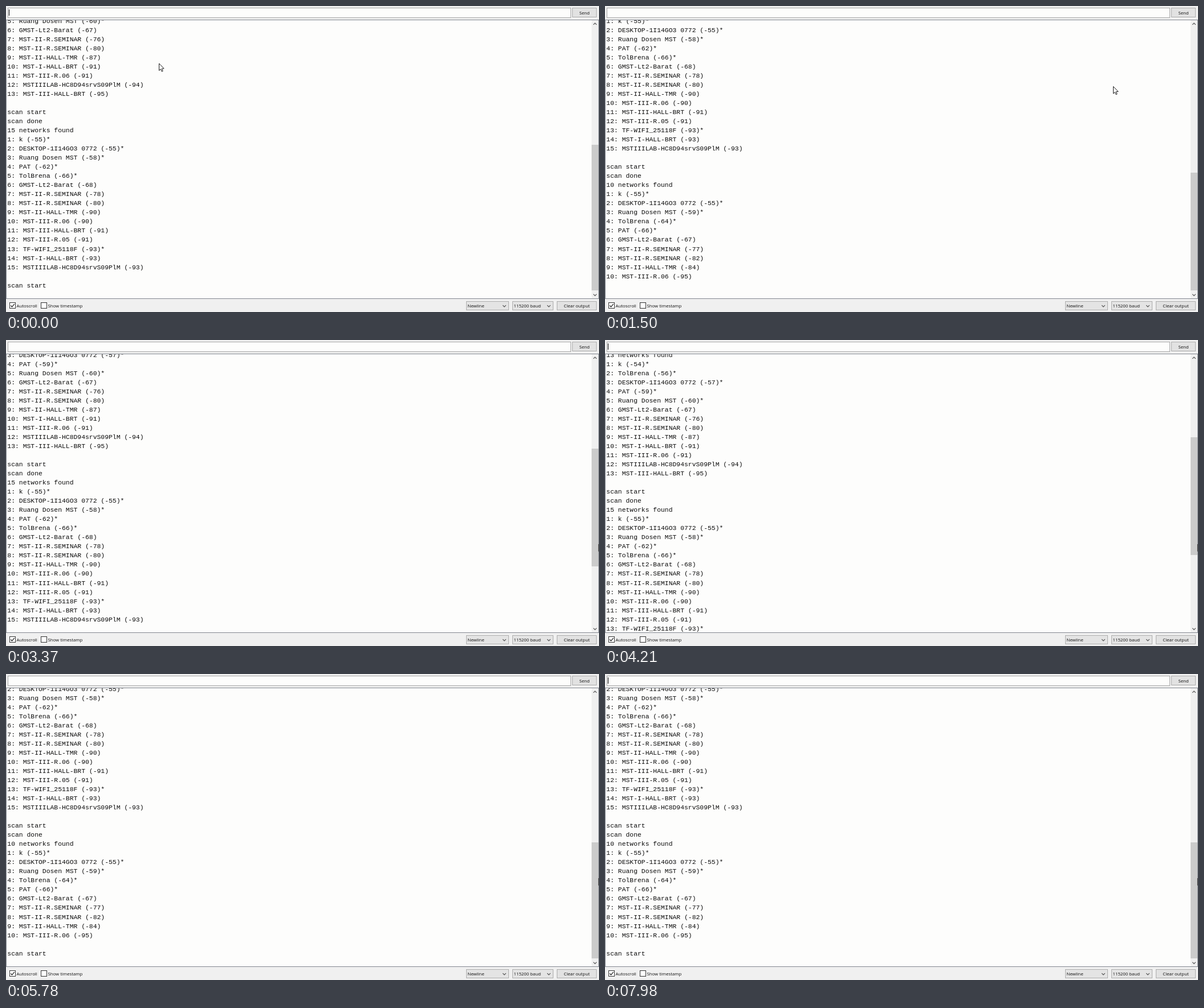
These frames come from a looping animation (1040x538 px, 8 s). An HTML page with a canvas:

```html
<!DOCTYPE html>
<html lang="en">
<head>
<meta charset="utf-8">
<title>Serial monitor</title>
<style>
html, body { margin: 0; width: 100%; height: 100%; overflow: hidden; background: #f0f0f0; }
canvas { display: block; width: 1040px; height: 538px; }
</style>
</head>
<body>
<canvas id="stage" width="1040" height="538"></canvas>
<script>
const ctx = document.getElementById('stage').getContext('2d');
const LOOP = 8000;
const ROW = 16.04, ROWS = 31;
const MONO = '11.4px "Liberation Mono", "Courier New", monospace';
const UI = '7.8px "Open Sans", "Noto Sans", sans-serif';

// Short keys for the access points that keep coming back
const AP = {
  k: 'k', D: 'DESKTOP-1I14GO3 0772', R: 'Ruang Dosen MST', P: 'PAT', F: 'TolBrena',
  G: 'GMST-Lt2-Barat', S: 'MST-II-R.SEMINAR', T: 'MST-II-HALL-TMR', B: 'MST-I-HALL-BRT',
  H: 'MST-III-HALL-BRT', 6: 'MST-III-R.06', 5: 'MST-III-R.05', W: 'TF-WIFI_25118F',
  L: 'MSTIIILAB-HC8D94srvS09PlM'
};
const SECURED = 'kDRPFW';

function scan(spec) {
  const items = spec.split(' ');
  return [
    items.length + ' networks found',
    ...items.map((s, i) =>
      `${i + 1}: ${AP[s[0]]} (-${s.slice(1)})${SECURED.includes(s[0]) ? '*' : ''}`),
    '', 'scan start'
  ];
}

const log = [
  ...scan('k54 F56 D57 P59 R60 G67 S76 S80 T87 B91 691 L94 H95'), 'scan done',
  ...scan('k55 D55 R58 P62 F66 G68 S78 S80 T90 690 H91 591 W93 B93 L93'), 'scan done',
  ...scan('k55 D55 R59 F64 P66 G67 S77 S82 T84 695'), ''
];
const HIDDEN = 19.3; // rows of log above the first one kept

// [time, number of lines printed, trailing empty line included]
const prints = [[0, 36], [40, 38], [70, 41], [110, 44], [140, 49], [5140, 50]];
// Wheel notches, three rows each
const notches = [2950, 3040, 3130, 3220, 3310, 3850];
// Pointer path: [time, x, y]
const path = [[440, 268.5, 101], [1300, 891.5, 141.5], [1560, 891.5, 141.5], [2130, 1039.4, 359]];

function lineCount(t) {
  return prints.filter(p => p[0] <= t).pop()[1];
}

function firstRow(t, count) {
  const bottom = count - ROWS;
  if (t >= 5140) return bottom;
  return bottom - 3 * notches.filter(n => n <= t).length;
}

function pointerAt(t) {
  if (t <= path[0][0]) return path[0].slice(1);
  for (let i = 1; i < path.length; i++) {
    const [t0, x0, y0] = path[i - 1], [t1, x1, y1] = path[i];
    if (t < t1) {
      const u = (t - t0) / (t1 - t0), e = u * u * (3 - 2 * u);
      return [x0 + (x1 - x0) * e, y0 + (y1 - y0) * e];
    }
  }
  return path[path.length - 1].slice(1);
}

function rect(x, y, w, h, color) {
  ctx.fillStyle = color;
  ctx.fillRect(x, y, w, h);
}

function box(x, y, w, h, fill, border) {
  rect(x, y, w, h, border);
  rect(x + 1, y + 1, w - 2, h - 2, fill);
}

function label(text, x, y, align = 'left') {
  ctx.font = UI;
  ctx.textAlign = align;
  ctx.fillStyle = '#101010';
  ctx.fillText(text, x, y);
}

function stroke(points, color, width) {
  ctx.beginPath();
  points.forEach(([x, y]) => ctx.lineTo(x, y));
  ctx.strokeStyle = color;
  ctx.lineWidth = width;
  ctx.stroke();
}

function chevron(x, y, dir, size, color) {
  stroke([[x - size, y - dir * size / 2], [x, y + dir * size / 2], [x + size, y - dir * size / 2]], color, 1.2);
}

function button(text, x, y, w, h) {
  box(x, y, w, h, '#e2e2e2', '#adadad');
  label(text, x + w / 2, y + h / 2 + 3, 'center');
}

function combo(text, x, w) {
  box(x, 519, w, 16, '#e4e4e4', '#adadad');
  label(text, x + 2.5, 529.5);
  chevron(x + w - 8, 527.5, 1, 2.8, '#505050');
}

function checkbox(text, x, checked) {
  box(x, 521, 11, 11, '#ffffff', '#333333');
  if (checked) stroke([[x + 2.3, 526.5], [x + 4.5, 529], [x + 8.8, 523.8]], '#222222', 1.2);
  label(text, x + 12.5, 529.5);
}

function drawLog(first, count) {
  rect(0, 24, 1040, 491, '#828790');
  rect(1, 25, 1038, 489, '#fdfdfc');
  ctx.save();
  ctx.beginPath();
  ctx.rect(1, 25, 1026, 489);
  ctx.clip();
  ctx.font = MONO;
  ctx.textAlign = 'left';
  ctx.fillStyle = '#0c0c0c';
  for (let r = 0; r < ROWS && first + r < count - 1; r++) {
    ctx.fillText(log[first + r], 2.3, Math.round(29.5 + r * ROW));
  }
  ctx.restore();
}

function drawScrollbar(first, count) {
  const total = count + HIDDEN, track = 463;
  rect(1027, 25, 12, 489, '#f0f0f0');
  const top = Math.round(37 + track * (first + HIDDEN + 0.45) / total);
  const size = Math.round(track * 30.55 / total);
  rect(1027, top, 12, size, '#cbcbcb');
  chevron(1033, 31.5, -1, 2.8, '#505050');
  chevron(1033, 508, 1, 2.8, '#505050');
}

function drawPointer(x, y) {
  ctx.save();
  ctx.translate(x, y);
  ctx.beginPath();
  [[0, 0], [0, 12.5], [2.8, 9.9], [4.7, 14.2], [6.6, 13.4], [4.8, 9.2], [8.6, 9]]
    .forEach(p => ctx.lineTo(...p));
  ctx.closePath();
  ctx.fillStyle = '#ffffff';
  ctx.fill();
  ctx.strokeStyle = '#1a1a1a';
  ctx.lineWidth = 1;
  ctx.stroke();
  ctx.restore();
}

function draw(t) {
  const count = lineCount(t), first = firstRow(t, count);
  rect(0, 0, 1040, 538, '#f0f0f0');

  box(3, 3, 988, 18, '#fdfdfc', '#a5a5a5');
  if ((t + 200) % 1000 < 500) rect(5, 6, 1, 11, '#000000');
  button('Send', 993, 3, 43, 17);

  drawLog(first, count);
  drawScrollbar(first, count);

  checkbox('Autoscroll', 6, true);
  checkbox('Show timestamp', 61, false);
  combo('Newline', 807, 75);
  combo('115200 baud', 888, 72);
  button('Clear output', 966, 519, 70, 16);

  drawPointer(...pointerAt(t));
}

const start = performance.now();
function tick() {
  draw((performance.now() - start) % LOOP);
  requestAnimationFrame(tick);
}
tick();
</script>
</body>
</html>
```
